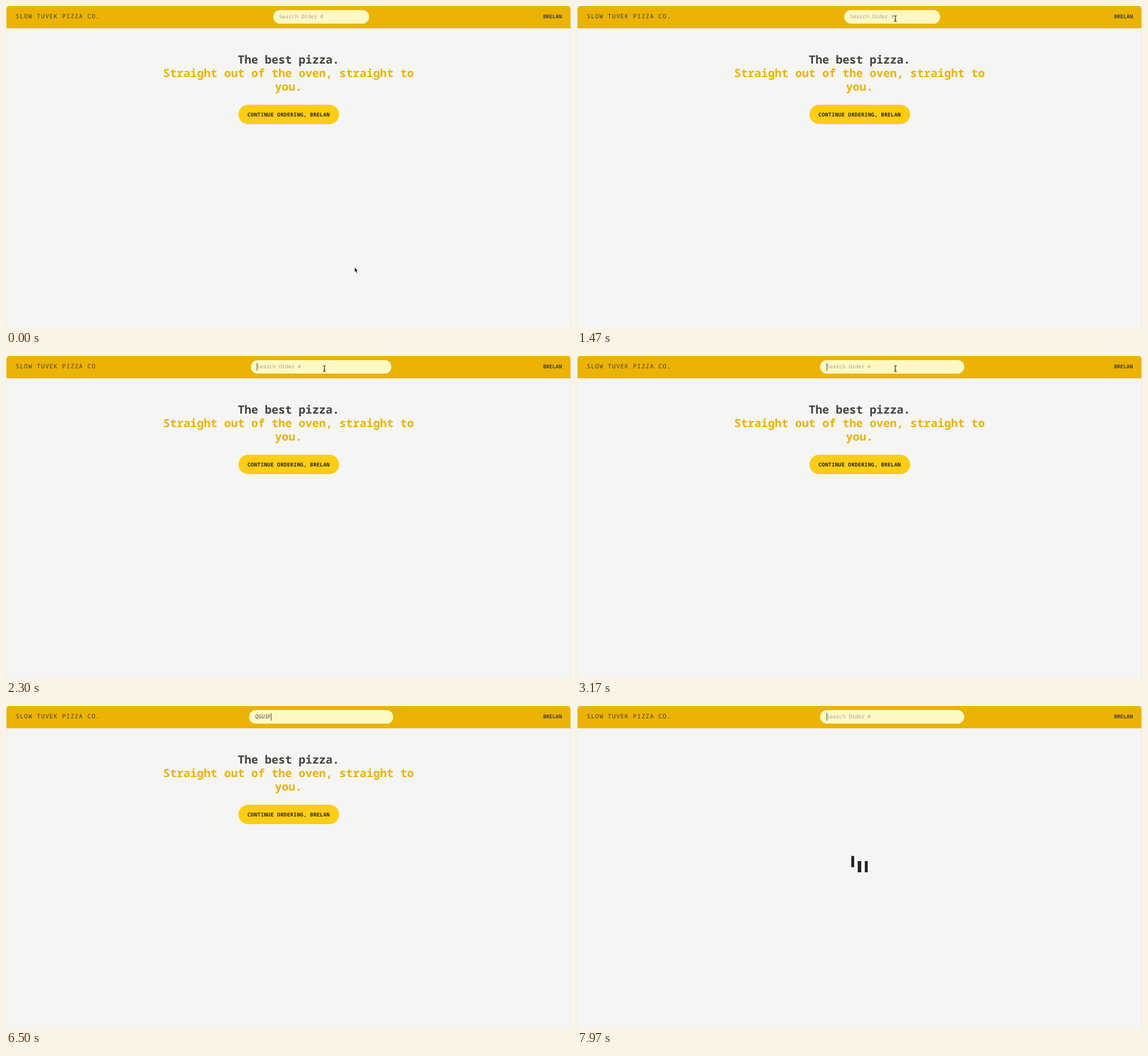
An HTML page that plays this animation: 960 by 548 pixels, repeating every 8000 ms.

```html
<!DOCTYPE html>
<html lang="en">
<head>
<meta charset="utf-8">
<title>Pizza order search</title>
<style>
  :root {
    --loop: 8s;
    --ink: #44403c;
    --dark: #292524;
    --gold: #ebb305;
    --ease: cubic-bezier(.4, 0, .2, 1);
  }
  html, body { margin: 0; width: 100%; height: 100%; overflow: hidden; background: #e9e9e8; }
  body {
    position: relative;
    font: 8.96px/12.8px "Roboto Mono", "Noto Sans Mono", "DejaVu Sans Mono", monospace;
    color: var(--ink);
    text-rendering: geometricPrecision;
    cursor: default;
  }
  body *, body *::after { position: absolute; box-sizing: border-box; white-space: pre; }

  .page { inset: 0 .7px 0 1px; background: #f5f5f3; border-radius: 5px 5px 4px 4px; overflow: hidden; }
  .bar { inset: 0 0 auto; height: 38px; background: var(--gold); }
  .brand { left: 16.5px; top: 10.4px; font-size: 10.24px; line-height: 16px; letter-spacing: .1em; }
  .user { right: 15.4px; top: 12.1px; font-weight: 600; }

  /* search field */
  .search {
    left: 453.8px; top: 7px; width: 163.6px; height: 23px;
    border-radius: 12px; background: #fef9c3;
    animation: grow var(--loop) infinite, ring var(--loop) infinite;
  }
  .hint, .typed { left: 10.24px; top: 5.1px; height: 12.8px; }
  .hint { color: #a8a29e; animation: hint var(--loop) step-end infinite; }
  .typed { width: 0; animation: type var(--loop) step-end infinite; }
  .typed span { inset: 0; overflow: hidden; }
  .typed::after {
    content: ""; left: 100%; top: 0; width: .9px; height: 12.6px;
    background: var(--ink); animation: blink var(--loop) step-end infinite;
  }

  /* welcome */
  .home { inset: 0; animation: leave var(--loop) step-end infinite; }
  h1 {
    left: 0; right: 0; top: 79px; margin: 0;
    font-size: 19.2px; line-height: 23.04px; font-weight: 600; text-align: center;
  }
  h1 span { position: static; color: var(--gold); }
  .button {
    left: 394.9px; top: 168px; width: 170.7px; height: 33.2px;
    border-radius: 17px; background: #fdcc14; color: var(--dark);
    font-weight: 600; line-height: 33.2px; letter-spacing: .025em; padding-left: 15.36px;
  }

  /* loader */
  .loader { left: 465.7px; top: 264px; animation: arrive var(--loop) step-end infinite; }
  .loader i { width: 5.76px; height: 19.2px; background: #262524; }
  .loader i:nth-child(1) { animation: rise var(--loop) linear infinite; }
  .loader i:nth-child(2) { left: 11.52px; }
  .loader i:nth-child(3) { left: 23.04px; }

  /* pointer */
  .mouse { left: 0; top: 0; animation: move var(--loop) infinite; }
  .mouse svg { overflow: visible; left: 0; top: 0; width: 1px; height: 1px; }
  .arrow { animation: arrow var(--loop) step-end infinite; }
  .beam { animation: beam var(--loop) step-end infinite; }

  @keyframes grow {
    0%, 24% { left: 453.8px; width: 163.6px; animation-timing-function: var(--ease); }
    31%, 100% { left: 413.3px; width: 244.8px; }
  }
  @keyframes ring {
    0%, 24% { box-shadow: 0 0 0 1.8px rgba(68, 64, 60, 0); }
    24.01% { box-shadow: 0 0 0 1.8px rgba(68, 64, 60, .75); animation-timing-function: var(--ease); }
    31%, 100% { box-shadow: 0 0 0 1.3px rgba(68, 64, 60, 0); }
  }
  @keyframes hint {
    0%, 97.125% { opacity: 1; }
    46.25% { opacity: 0; }
    100% { opacity: 1; }
  }
  @keyframes type {
    0% { width: 0; }
    46.25% { width: 1ch; }
    55.875% { width: 2ch; }
    62.5% { width: 3ch; }
    74.625% { width: 4ch; }
    80.875% { width: 5ch; }
    86.25% { width: 6ch; }
    97.125%, 100% { width: 0; }
  }
  @keyframes blink {
    0%, 30.375%, 42.875%, 52.5%, 66.25%, 92.5% { opacity: 0; }
    24%, 36.625%, 46.25%, 55.875%, 72.875%, 97.125%, 100% { opacity: .9; }
  }
  @keyframes leave {
    0% { visibility: visible; }
    97.375%, 100% { visibility: hidden; }
  }
  @keyframes arrive {
    0% { visibility: hidden; }
    97.375%, 100% { visibility: visible; }
  }
  @keyframes rise {
    0%, 97.375% { transform: none; }
    99.875%, 100% { transform: translateY(-9.6px); }
  }
  @keyframes move {
    0%, .4% { transform: translate(592px, 444px); animation-timing-function: var(--ease); }
    7.5%, 100% { transform: translate(541px, 21.5px); }
  }
  @keyframes arrow {
    0% { opacity: 1; }
    6.2%, 100% { opacity: 0; }
  }
  @keyframes beam {
    0%, 46.25% { opacity: 0; }
    6.2% { opacity: 1; }
    100% { opacity: 0; }
  }
</style>
</head>
<body>
  <div class="page"><div class="bar"></div></div>
  <div class="brand">SLOW TUVEK PIZZA CO.</div>
  <div class="user">BRELAN</div>

  <div class="search">
    <div class="hint">Search Order #</div>
    <div class="typed"><span>QGU3FK</span></div>
  </div>

  <div class="home">
    <h1>The best pizza.
<span>Straight out of the oven, straight to
you.</span></h1>
    <div class="button">CONTINUE ORDERING, BRELAN</div>
  </div>

  <div class="loader"><i></i><i></i><i></i></div>

  <div class="mouse">
    <svg class="arrow"><path d="M.3 .3V9.2L2.2 7.5 3.6 10.8 5.1 10.2 3.7 7H6.2Z" fill="#111" stroke="#fff" stroke-width=".6"/></svg>
    <svg class="beam"><path d="M-2.5-5Q-.3-5 0-4 .3-5 2.5-5M0-4V4M-2.5 5Q-.3 5 0 4 .3 5 2.5 5M-1.3 1.7H1.3" fill="none" stroke="#2b2a26" stroke-width="1.1"/></svg>
  </div>
</body>
</html>
```
